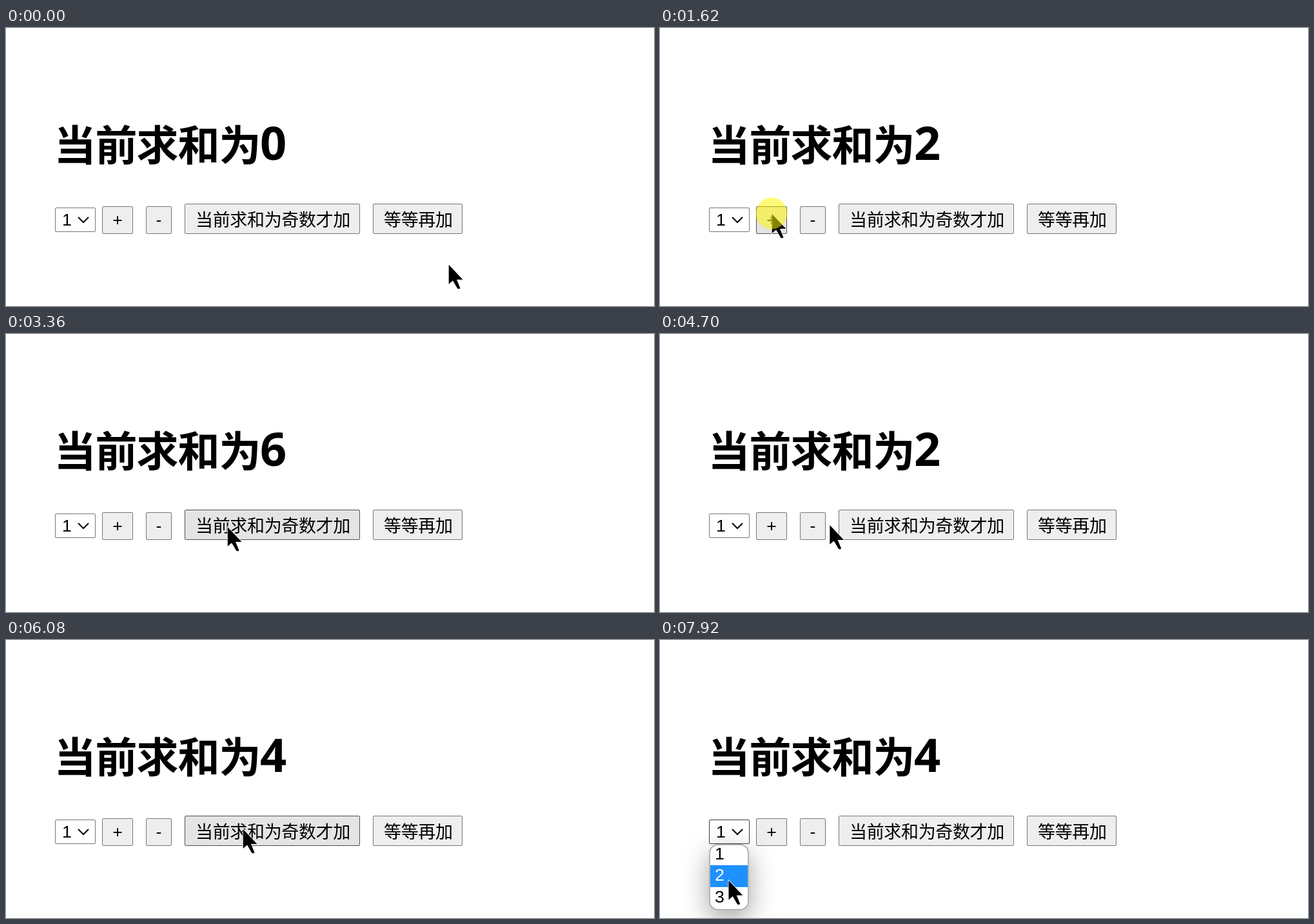
Recreate the animation shown at these times as an HTML page. Size 1005 by 432 pixels, loop 8000 ms.

```html
<!DOCTYPE html>
<html lang="zh-CN">
<head>
<meta charset="utf-8">
<title>当前求和</title>
<style>
  html, body { margin: 0; width: 100%; height: 100%; overflow: hidden; background: #fff; }
  svg { display: block; width: 1005px; height: 432px; }
  text { font-family: "Liberation Sans", sans-serif; font-size: 26.67px; }
  .cjk { font-family: "Noto Sans CJK SC", "Noto Sans CJK", sans-serif; font-size: 27px; font-weight: 350; letter-spacing: -.33px; }
  .title { font-size: 65px; font-weight: 700; letter-spacing: -1px; }
  .sum { font-family: "Open Sans", "Noto Sans", sans-serif; font-size: 72px; font-weight: 700; }
  .mid { text-anchor: middle; }
  .box { fill: #eee; stroke: #767676; }
  .box.hover { fill: #e4e4e4; stroke: #4f4f4f; }
  .select { fill: #fff; stroke: #767676; }
  .select.hover { stroke: #3c3c3c; }
  #popup { visibility: hidden; }
  #panel { filter: drop-shadow(0 14px 20px rgba(0, 0, 0, .36)); }
</style>
</head>
<body>
<svg viewBox="0 0 1005 432">
  <text class="cjk title" x="74.5" y="205.5">当前求和为</text>
  <text class="sum" id="sum" x="394" y="205">0</text>

  <rect class="select" id="select" x="76.5" y="279.5" width="62" height="37" rx="1.5"/>
  <text x="87" y="307">1</text>
  <path d="M112 294l8 8l8-8" fill="none" stroke="#000" stroke-width="2"/>

  <rect class="box" x="149.5" y="277.5" width="47" height="42" rx="1.5"/>
  <text class="mid" x="173" y="307">+</text>
  <rect class="box" x="217.5" y="277.5" width="39" height="42" rx="1.5"/>
  <text class="mid" x="237" y="307">-</text>
  <rect class="box" x="277.5" y="273.5" width="271" height="46" rx="1.5"/>
  <text class="cjk" x="294" y="308">当前求和为奇数才加</text>
  <rect class="box" x="569.5" y="273.5" width="138" height="46" rx="1.5"/>
  <text class="cjk" x="586" y="308">等等再加</text>

  <g id="popup">
    <clipPath id="inner"><rect x="78" y="319" width="58" height="99" rx="12"/></clipPath>
    <rect id="panel" x="77" y="318" width="60" height="101" rx="13" fill="#fff" stroke="#b4b4b4" stroke-width="2"/>
    <rect id="mark" x="78" width="58" height="34" fill="#1e90ff" clip-path="url(#inner)"/>
    <text class="item" x="85" y="341">1</text>
    <text class="item" x="85" y="374">2</text>
    <text class="item" x="85" y="408">3</text>
  </g>

  <path id="cursor" d="M.7 1V31L7 25.5L14 37.5Q16 39.5 18.5 37.5L13 24H22.5Z"
        stroke="#fff" stroke-width="1.5" paint-order="stroke"/>
  <circle id="halo" r="24.5" fill="#fff500" fill-opacity=".53"/>
</svg>
<script>
const LOOP = 8000, TICK = 70, SAG = 10;
const $ = id => document.getElementById(id);
const boxes = [...document.querySelectorAll('.box, .select')];
const items = [...document.querySelectorAll('.item')];

// Places the pointer visits, and what a click there does to the sum
const start = { x: 686, y: 367 };
const plus = { x: 173, y: 288, click: n => n + 1 };
const minus = { x: 232, y: 297, click: n => n - 1 };
const odd = { x: 367, y: 293, click: n => n + n % 2 };
const select = { x: 82.5, y: 293, click: n => n };
const option = { x: 108.5, y: 382 };

const moves = [], clicks = [];
const go = (to, at, dur) => moves.push({ to, at, dur });
const tap = (on, at, times = 1, every = 0) => {
  for (let i = 0; i < times; i++) clicks.push({ on, at: at + i * every });
};

go(plus, 70, 820);
tap(plus, 960, 2, 260);
tap(plus, 1620, 4, 246);
go(odd, 2560, 350);
tap(odd, 2970);
go(minus, 3360, 252);
tap(minus, 3690, 4, 205);
go(odd, 4700, 210);
go(plus, 4980, 350);
tap(plus, 5400);
go(odd, 5600, 350);
tap(odd, 6010, 2, 330);
go(select, 6680, 210);
tap(select, 7020);
go(option, 7230, 760);

// The pointer advances once per tick and dips slightly on its way left
function pointer(t) {
  let { x, y } = start;
  for (const { to, at, dur } of moves) {
    if (t < at) break;
    const tick = Math.floor((t - at) / TICK) + 1;
    const k = Math.min(1, tick * TICK / dur) ** 1.35;
    const dip = to.x < x ? SAG * Math.sin(Math.PI * k) : 0;
    x += (to.x - x) * k;
    y += (to.y - y) * k + dip;
  }
  return [x, y];
}

function inside(el, x, y) {
  const b = el.getBBox();
  return x >= b.x && x <= b.x + b.width && y >= b.y && y <= b.y + b.height;
}

function draw(now) {
  const t = now % LOOP, [x, y] = pointer(t);
  const down = clicks.some(c => t >= c.at && t < c.at + TICK);
  const done = clicks.filter(c => t >= c.at + TICK);
  const open = done.some(c => c.on === select);
  const place = `translate(${x} ${y})`;

  $('sum').textContent = done.reduce((n, c) => c.on.click(n), 0);
  $('cursor').setAttribute('transform', place);
  $('halo').setAttribute('transform', place);
  $('halo').style.visibility = down ? 'visible' : 'hidden';
  for (const el of boxes)
    el.classList.toggle('hover', open ? el.id === 'select' : inside(el, x, y));

  const row = y < 350 ? 0 : 1;
  $('popup').style.visibility = open ? 'visible' : 'hidden';
  $('mark').setAttribute('y', 316 + row * 34);
  items.forEach((el, i) => el.setAttribute('fill', i === row ? '#fff' : '#000'));
  requestAnimationFrame(draw);
}
draw(performance.now());
</script>
</body>
</html>
```
